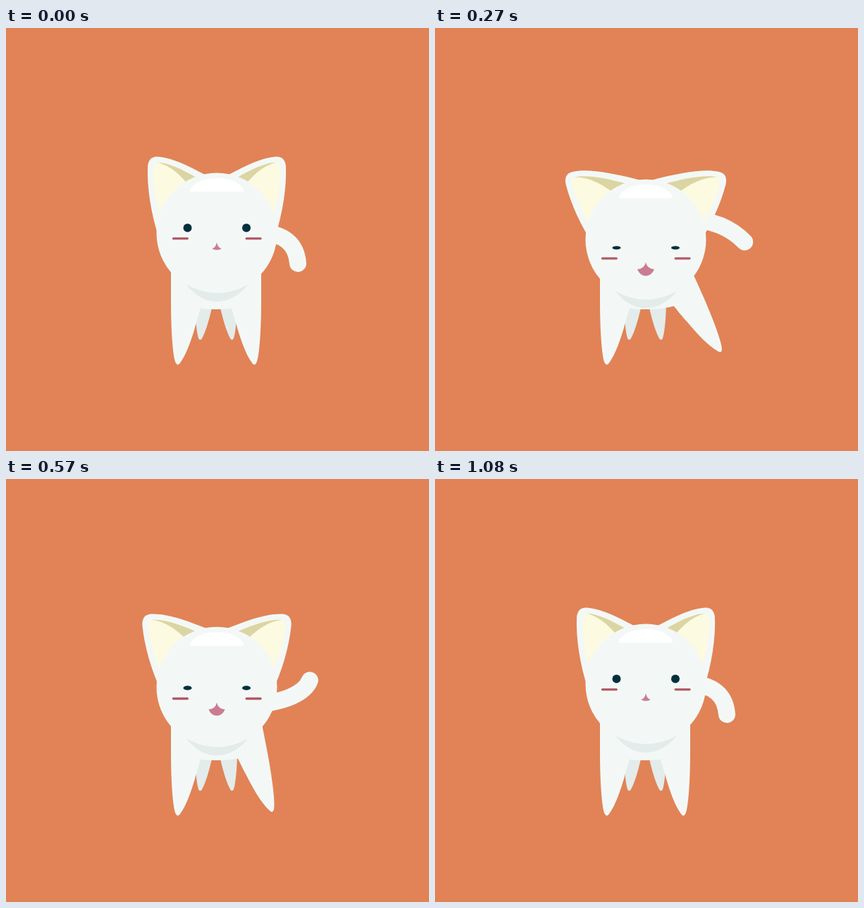
Animation of 600x600 px, one loop 1.29 s. Source, as an HTML page with a canvas:

```html
<!DOCTYPE html>
<html lang="en">
<head>
<meta charset="utf-8">
<title>Waving cat</title>
<style>
html, body { margin: 0; width: 100%; height: 100%; overflow: hidden; background: #e18356; }
canvas { display: block; }
</style>
</head>
<body>
<canvas id="stage" width="600" height="600"></canvas>
<script>
const ctx = document.getElementById('stage').getContext('2d');
const LOOP = 1290, ACTIVE = 1080, STEP = 30, THIRD = ACTIVE / 3;

const COLOR = {
  bg: '#e18356', fur: '#f3f8f7', shade: '#e3ecea', shine: '#ffffff',
  cream: '#fcfae1', khaki: '#dbd5a3', eye: '#03303e', cheek: '#b35a66', mouth: '#cb7c92'
};

const SHAPE = {
  hind: new Path2D('M292 390 H268 C268.5 415 271 436 273.5 441 Q275.5 443.5 277.5 441 C282 434 288 415 292 397 Z'),
  leg: new Path2D('M234 340 V388 C234 430 237 472 241.5 476 Q244 479.5 247 475 C256 463 264 440 270 418 C274 405 278 390 288 350 Z'),
  body: new Path2D('M234 320 H362 V379 A64 20 0 0 1 234 379 Z'),
  ear: new Path2D('M304 221 L296 216 C268 200 238 184 215 182.5 Q202 182 201 197 C200 225 205 262 217 298 L299 291 Z'),
  earIn: new Path2D('M218 190.5 Q209 190 209 203 C209 225 213 248 221 272 L299 291 L272 213 C250 200 235 192 218 190.5 Z'),
  earFold: new Path2D('M215 190.5 C236 192 260 206 284 220 L266 232 C250 210 235 196 215 190.5 Z'),
  shine: new Path2D('M262 227.5 C270 217 284 213 299 213 C314 213 328 217 336 227.5 Q339 232.3 334 232.3 H264 Q259 232.3 262 227.5 Z'),
  chin: new Path2D('M256 364 Q300 388 343 364 C318 396 280 396 256 364 Z')
};

// Tail poses: base, control point, tip.
const TAIL = {
  rest: [360, 290, 411, 292, 414, 334],
  out: [354, 268, 409, 270, 442, 300],
  up: [342, 349, 424, 339, 425, 278]
};

const clamp = u => Math.min(1, Math.max(0, u));
const progress = (t, from, to) => clamp((t - from) / (to - from));
const ease = u => u < 0.5 ? 2 * u * u : 1 - 2 * (1 - u) * (1 - u);
const mix = (a, b, u) => a.map((v, i) => v + (b[i] - v) * u);

// Rises from 0 to 1 between a and b, falls back between c and d.
const pulse = (t, a, b, c, d) => ease(progress(t, a, b)) - ease(progress(t, c, d));

function fill(shape, color) {
  ctx.fillStyle = color;
  ctx.fill(shape);
}

function stroke(width, color) {
  ctx.lineCap = 'round';
  ctx.lineWidth = width;
  ctx.strokeStyle = color;
  ctx.stroke();
}

function scoped(paint) {
  ctx.save();
  paint();
  ctx.restore();
}

// Paints once as is and once mirrored around x = axis.
function both(axis, paint) {
  scoped(() => paint(false));
  scoped(() => {
    ctx.translate(2 * axis, 0);
    ctx.scale(-1, 1);
    paint(true);
  });
}

function turn(x, y, deg) {
  ctx.translate(x, y);
  ctx.rotate(deg * Math.PI / 180);
  ctx.translate(-x, -y);
}

function ellipse(x, y, rx, ry, color) {
  ctx.beginPath();
  ctx.ellipse(x, y, rx, ry, 0, 0, 2 * Math.PI);
  ctx.fillStyle = color;
  ctx.fill();
}

function drawTail(t) {
  let pose = mix(TAIL.rest, TAIL.out, progress(t, 0, 300));
  pose = mix(pose, TAIL.up, ease(progress(t, THIRD, 2 * THIRD)));
  pose = mix(pose, TAIL.rest, ease(progress(t, 2 * THIRD, ACTIVE)));
  const [x, y, ...curve] = pose;
  ctx.beginPath();
  ctx.moveTo(x, y);
  ctx.quadraticCurveTo(...curve);
  stroke(24, COLOR.fur);
}

function drawBody(bow) {
  both(298, () => fill(SHAPE.hind, COLOR.shade));
  fill(SHAPE.body, COLOR.fur);
  both(298, right => {
    if (right) turn(259, 345, 27.7 * bow);
    fill(SHAPE.leg, COLOR.fur);
  });
}

function drawHead(bow) {
  ctx.translate(0, 10.5 * bow);
  both(299, () => {
    turn(248, 259, -18.5 * bow);
    fill(SHAPE.ear, COLOR.fur);
    fill(SHAPE.earIn, COLOR.cream);
    fill(SHAPE.earFold, COLOR.khaki);
  });
  ellipse(299, 291, 85.5, 85.5, COLOR.fur);
  fill(SHAPE.shine, COLOR.shine);
  fill(SHAPE.chin, COLOR.shade);
}

function drawFace(bow, blink, open) {
  ctx.translate(0, 32.3 * bow);
  both(299.25, () => {
    ellipse(257.5, 283.5, 6, 6 - 3.5 * blink, COLOR.eye);
    ctx.beginPath();
    ctx.moveTo(237.5, 298.6);
    ctx.lineTo(257.3, 298.6);
    stroke(3.4, COLOR.cheek);
  });
  const w = 6.5 + 5.5 * open, y = 312.8 + 1.2 * open;
  const low = y + 2.7 + 10 * open;
  ctx.beginPath();
  ctx.moveTo(299, 304);
  ctx.quadraticCurveTo(300.5, y - 1, 299 + w, y);
  ctx.bezierCurveTo(299 + w * 0.6, low, 299 - w * 0.6, low, 299 - w, y);
  ctx.quadraticCurveTo(297.5, y - 1, 299, 304);
  ctx.fillStyle = COLOR.mouth;
  ctx.fill();
}

function draw(t) {
  const bow = pulse(t, 0, 360, 360, 740);
  const blink = pulse(t, 0, 240, 500, 740);
  const open = Math.max(pulse(t, 0, 300, 300, 560), pulse(t, 425, 605, 860, 1080));
  ctx.fillStyle = COLOR.bg;
  ctx.fillRect(0, 0, 600, 600);
  drawTail(t);
  drawBody(bow);
  scoped(() => drawHead(bow));
  scoped(() => drawFace(bow, blink, open));
}

const start = performance.now();
function tick() {
  const t = Math.max(0, performance.now() - start) % LOOP;
  draw(Math.min(ACTIVE, Math.floor(t / STEP) * STEP));
  requestAnimationFrame(tick);
}
tick();
</script>
</body>
</html>
```
